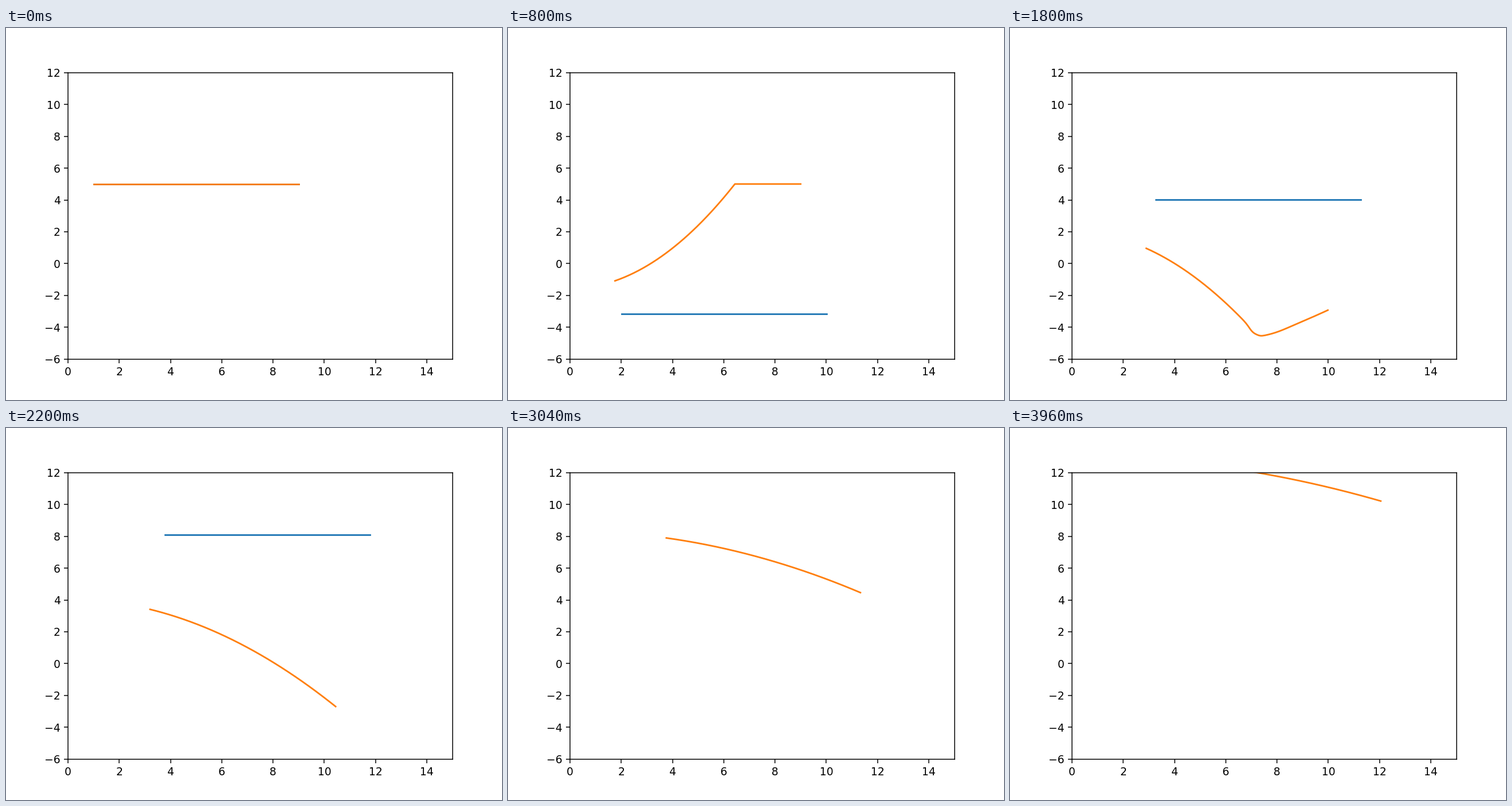
These frames come from a looping animation (864 by 648 pixels, 4 s). A matplotlib script:

```python
import numpy as np
import matplotlib.pyplot as plt
from matplotlib.animation import FuncAnimation

FRAMES = 100
INTERVAL = 40

DRIFT = 0.0506      # sideways speed of the rod, units per frame
C = 0.4074          # vertical speed of the rod and speed of light
TURN = 23.715       # moment at which the rod reverses
START_Y = 5.0

rod = np.linspace(1, 9, 160)


def place(t):
    """Offset in x and height of the rod at time t; it rests before t = 0."""
    t = np.maximum(t, 0)
    d = t - TURN
    u = (d / 1.1) ** 2
    y = START_Y - C * TURN + np.hypot(0.125, C * d) - 0.07 * u * np.exp(1 - u)
    return DRIFT * t, y


def seen(t):
    """Rod as seen from the origin, with the light travel time included."""
    lo = np.full(rod.shape, t - 60.0)
    hi = np.full(rod.shape, float(t))
    for _ in range(45):
        mid = (lo + hi) / 2
        dx, y = place(mid)
        late = np.hypot(rod + dx, y) > C * (t - mid)
        hi = np.where(late, mid, hi)
        lo = np.where(late, lo, mid)
    dx, y = place(lo)
    return rod + dx, y


fig, ax = plt.subplots(figsize=(6.4, 4.8), dpi=135)
ax.set_xlim(0, 15)
ax.set_ylim(-6, 12)
true_line, = ax.plot([], [], color="#1f77b4", lw=1.5)
seen_line, = ax.plot([], [], color="#ff7f0e", lw=1.5)


def draw(i):
    dx, y = place(i)
    true_line.set_data([1 + dx, 9 + dx], [y, y])
    seen_line.set_data(*seen(i))
    return true_line, seen_line


anim = FuncAnimation(fig, draw, frames=FRAMES, interval=INTERVAL,
                     repeat=True, repeat_delay=0, blit=False)
plt.show()
```
